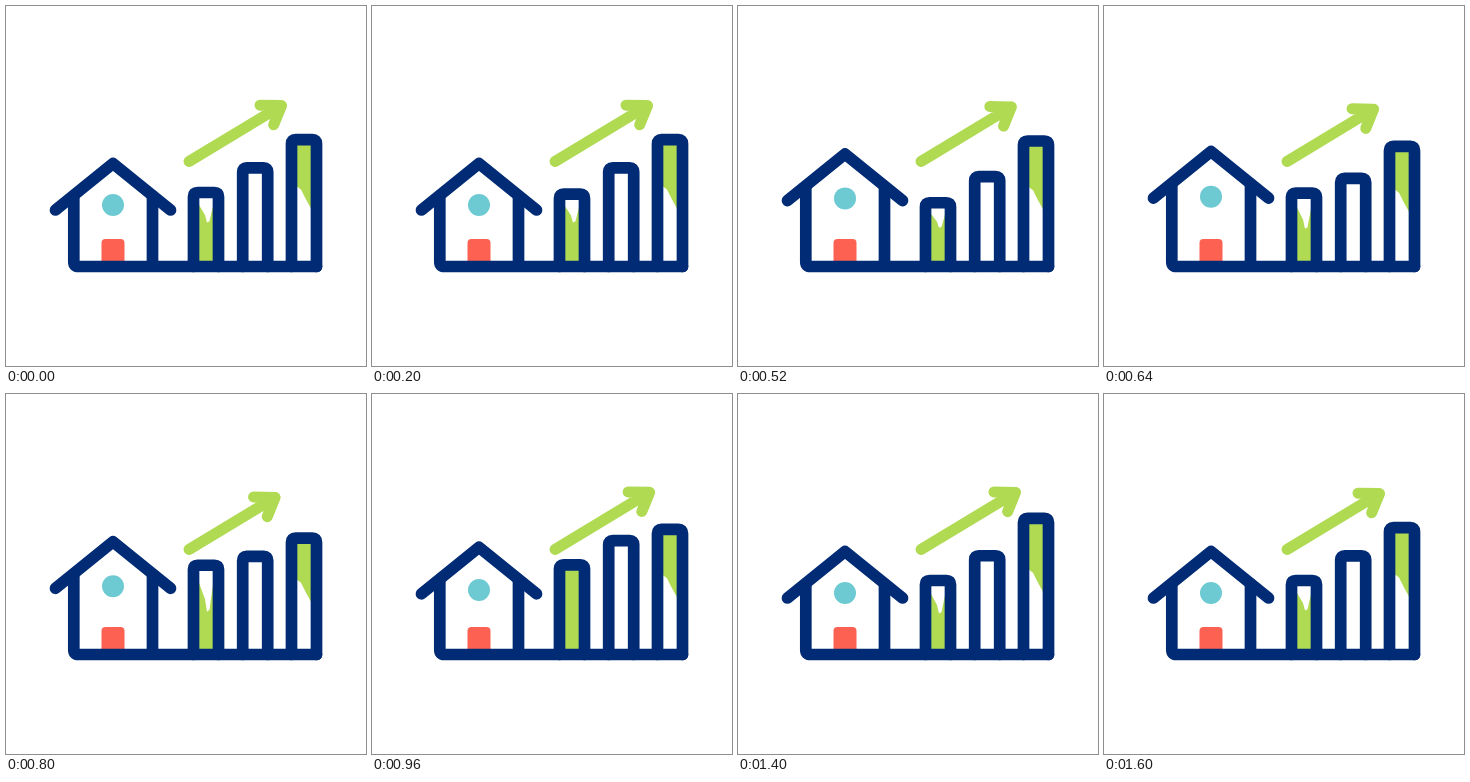
These frames come from a looping animation (360x360 px, 1640 ms). An HTML page with a canvas:

```html
<!DOCTYPE html>
<html lang="en">
<head>
<meta charset="utf-8">
<title>House price growth</title>
<style>
  html, body { margin: 0; width: 100%; height: 100%; overflow: hidden; background: #fff; }
  canvas { display: block; }
</style>
</head>
<body>
<canvas id="stage" width="360" height="360"></canvas>
<script>
const ctx = document.getElementById('stage').getContext('2d');
const LOOP = 1640, STEP = 40, FIRST_HOLD = 120, BASE = 260.5;
const NAVY = '#022b75', GREEN = '#afda52', TEAL = '#6ecad2', RED = '#fc6152';

ctx.lineCap = ctx.lineJoin = 'round';

// Eased value through [time, value] pairs
function ease(t, keys) {
  if (t <= keys[0][0]) return keys[0][1];
  for (let i = 1; i < keys.length; i++) {
    const [t0, a] = keys[i - 1], [t1, b] = keys[i];
    if (t < t1) {
      const p = (t - t0) / (t1 - t0);
      return a + (b - a) * p * p * (3 - 2 * p);
    }
  }
  return keys[keys.length - 1][1];
}

const bounce = t => ease(t, [[120, 0], [440, 10.5], [500, 10.5], [840, -16.3], [920, -16.3], [1250, 0]]);

function stroke(path, color, width) {
  ctx.strokeStyle = color;
  ctx.lineWidth = width;
  ctx.stroke(new Path2D(path));
}

const outline = path => stroke(path, NAVY, 11.7);

function fill(path, color) {
  ctx.fillStyle = color;
  ctx.fill(new Path2D(path));
}

function drawBar(x, top) {
  outline(`M${x} ${BASE}V${top + 4}q0-4 4-4h17q4 0 4 4V${BASE}`);
}

function drawHouse(t) {
  const lift = ease(t, [[190, 0], [660, -12], [1160, 0]]);
  fill('M95.5 257V237q0-4 4-4h15q4 0 4 4V257z', RED);
  ctx.fillStyle = TEAL;
  ctx.beginPath();
  ctx.arc(107, 199 + lift * 0.7, 11, 0, Math.PI * 2);
  ctx.fill();
  outline(`M49.5 ${204 + lift}L107 ${157.5 + lift}L164.5 ${204 + lift}`);
  const eave = 190 + lift;
  outline(`M67.8 ${eave}V256q0 4.5 4.5 4.5H310.5M146.5 ${eave}V${BASE}`);
}

function drawBars(t) {
  const top1 = 186.5 + bounce(t);
  const top2 = 161.8 + bounce(t - 160);
  const shift3 = bounce(t - 330), top3 = 133.7 + shift3;

  fill(`M190 ${top1}H210V${BASE}H190z`, GREEN);
  const depth = ease(t, [[0, 25], [520, 20], [780, 44], [920, 0], [1020, 0], [1200, 31], [1600, 25]]);
  const y = top1 + 5, down = k => y + depth * k;
  if (depth > 0)
    fill(`M193 ${y}H207V${down(.35)}L205.5 ${down(.6)}L203.5 ${down(.95)}L201 ${down(1)}L199 ${down(.7)}L196 ${down(.5)}L193 ${down(.3)}z`, '#fff');

  const sliver = ease(t, [[1000, 0], [1200, 4], [1400, 0]]);
  fill(`M242 ${top2}h${sliver}l-${sliver} 28z`, GREEN);

  fill(`M288 ${top3}H308V${BASE}H288z`, GREEN);
  const edge = 180.5 + shift3 * 0.5;
  fill(`M291 ${edge}l4 3 5 10 5 9V255H291z`, '#fff');

  drawBar(187.5, top1);
  drawBar(236.7, top2);
  drawBar(285.5, top3);
}

function drawArrow(t) {
  const dx = ease(t, [[400, 0], [740, -7.5], [1100, 7], [1560, 0]]);
  const x = 275.5 + dx, y = 99.6 - dx * 0.6;
  const head = `M${x - 21.5} ${y - .4}L${x} ${y}L${x - 7.8} ${y + 19.2}`;
  fill(head, GREEN);
  stroke(`M183 155.5L${x} ${y}${head}`, GREEN, 11);
}

function render(now) {
  const clock = now % LOOP;
  const t = clock < FIRST_HOLD ? 0 : Math.floor(clock / STEP) * STEP;
  ctx.clearRect(0, 0, 360, 360);
  drawArrow(t);
  drawBars(t);
  drawHouse(t);
}

const start = performance.now();
function loop() {
  render(performance.now() - start);
  requestAnimationFrame(loop);
}
loop();
</script>
</body>
</html>
```
